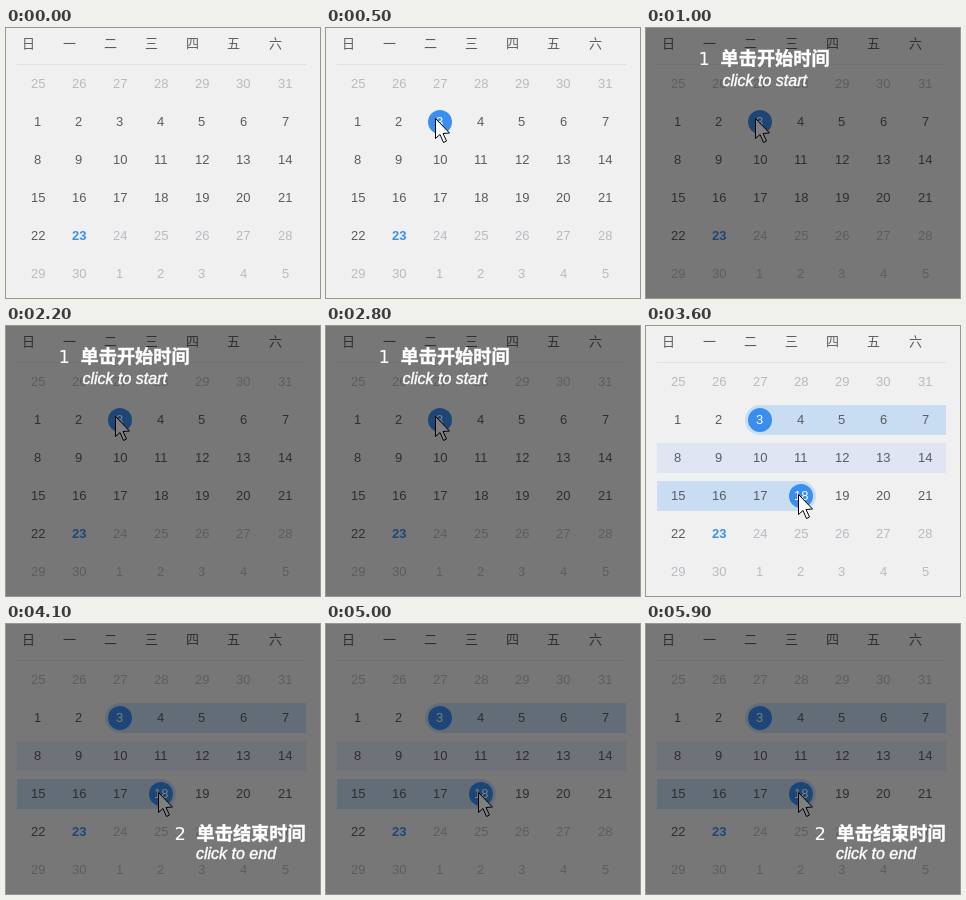
An HTML page with a canvas for the animation above (6.2 s loop, 314 px wide and 270 px high).

```html
<!DOCTYPE html>
<html lang="zh">
<head>
<meta charset="utf-8">
<title>Date range picker</title>
<style>
html, body { margin: 0; width: 100%; height: 100%; overflow: hidden; background: #f0f0f0; }
canvas { display: block; width: 314px; height: 270px; }
</style>
</head>
<body>
<canvas id="stage" width="314" height="270"></canvas>
<script>
const ctx = document.getElementById('stage').getContext('2d');
const LOOP = 6200, BLINK = 300;
const LATIN = '"Liberation Sans", sans-serif';
const CJK = '"Noto Sans CJK SC", "Noto Sans CJK", sans-serif';
const BLUE = '#3a8ef0', INK = '#5a5c60', MUTED = '#b6bbc2';
const LEFT = 11, RIGHT = 300, PITCH = 38;

// Columns are 41px wide, the last two 42px.
const colLeft = c => LEFT + c * 41 + Math.max(0, c - 5);
const colMid = c => (colLeft(c) + colLeft(c + 1)) / 2;
const rowY = r => 56 + r * PITCH;

function text(str, x, y, font, color, stroke = 0) {
  ctx.font = font;
  ctx.fillStyle = ctx.strokeStyle = color;
  ctx.fillText(str, x, y);
  if (stroke) {
    ctx.lineWidth = stroke;
    ctx.strokeText(str, x, y);
  }
}

function bar(row, x0, x1, color, radii) {
  ctx.fillStyle = color;
  ctx.beginPath();
  ctx.roundRect(x0, rowY(row) - 15, x1 - x0, 30, radii);
  ctx.fill();
}

function dot(col, row) {
  ctx.fillStyle = BLUE;
  ctx.beginPath();
  ctx.arc(Math.round(colMid(col)), rowY(row), 12, 0, Math.PI * 2);
  ctx.fill();
}

function cursor(x, y) {
  const outline = [[0, 0], [0, 20], [4.5, 16], [8, 24], [11, 22.5], [7.5, 15], [14, 14.5]];
  ctx.beginPath();
  outline.forEach(([dx, dy]) => ctx.lineTo(x + dx, y + dy));
  ctx.closePath();
  ctx.fillStyle = '#fff';
  ctx.fill();
  ctx.strokeStyle = '#000';
  ctx.lineWidth = 1;
  ctx.stroke();
}

function range() {
  const edge = '#c8dcf2', middle = '#dfe5f2';
  bar(1, 99, RIGHT, edge, [15, 0, 0, 15]);
  bar(2, LEFT, RIGHT, middle, 0);
  bar(3, LEFT, 170, edge, [0, 15, 15, 0]);
}

function calendar(selected) {
  [...'日一二三四五六'].forEach((day, c) =>
    text(day, colLeft(c) + 5, 20, '13px ' + CJK, INK));
  ctx.fillStyle = '#dfe0ee';
  ctx.fillRect(LEFT, 36, RIGHT - LEFT, 1);

  for (let i = 0; i < 42; i++) {
    const day = i - 6;
    const label = String(day < 1 ? day + 31 : day > 30 ? day - 30 : day);
    const today = day === 23;
    const color = selected.includes(day) ? '#fff'
      : today ? BLUE
      : day < 1 || day > 23 ? MUTED : INK;
    const font = (today ? 'bold ' : '') + '13px ' + LATIN;
    const x = Math.round(colMid(i % 7) - label.length * 3.5);
    text(label, x, rowY(Math.floor(i / 7)) + 4, font, color);
  }
}

function caption(num, title, hint, x, y, hintX, hintY) {
  text(num, x - 22, y, '18px "DejaVu Sans", sans-serif', '#fff');
  text(title, x, y, 'bold 18.2px ' + CJK, '#fff', 0.4);
  text(hint, hintX, hintY, 'italic 16px ' + LATIN, '#fff', 0.4);
}

function draw(t) {
  const picked = t >= 500, ranged = t >= 3600;
  const dimStart = t >= 4100 ? 4100 : t >= 1000 && t < 3100 ? 1000 : -1;

  ctx.fillStyle = '#f0f0f0';
  ctx.fillRect(0, 0, 314, 270);
  if (ranged) range();
  if (picked) dot(2, 1);
  if (ranged) dot(3, 3);
  calendar(ranged ? [3, 18] : picked ? [3] : []);
  if (ranged) cursor(152.5, 168.5);
  else if (picked) cursor(109.5, 90.5);

  if (dimStart < 0) return;
  ctx.fillStyle = 'rgba(0, 0, 0, 0.5)';
  ctx.fillRect(0, 0, 314, 270);
  if (Math.floor((t - dimStart) / BLINK) % 2) return;
  if (ranged) caption('2', '单击结束时间', 'click to end', 190.5, 216, 190, 235);
  else caption('1', '单击开始时间', 'click to start', 74.5, 37, 76.5, 58);
}

const start = performance.now();
function tick() {
  draw((performance.now() - start) % LOOP);
  requestAnimationFrame(tick);
}
tick();
</script>
</body>
</html>
```
